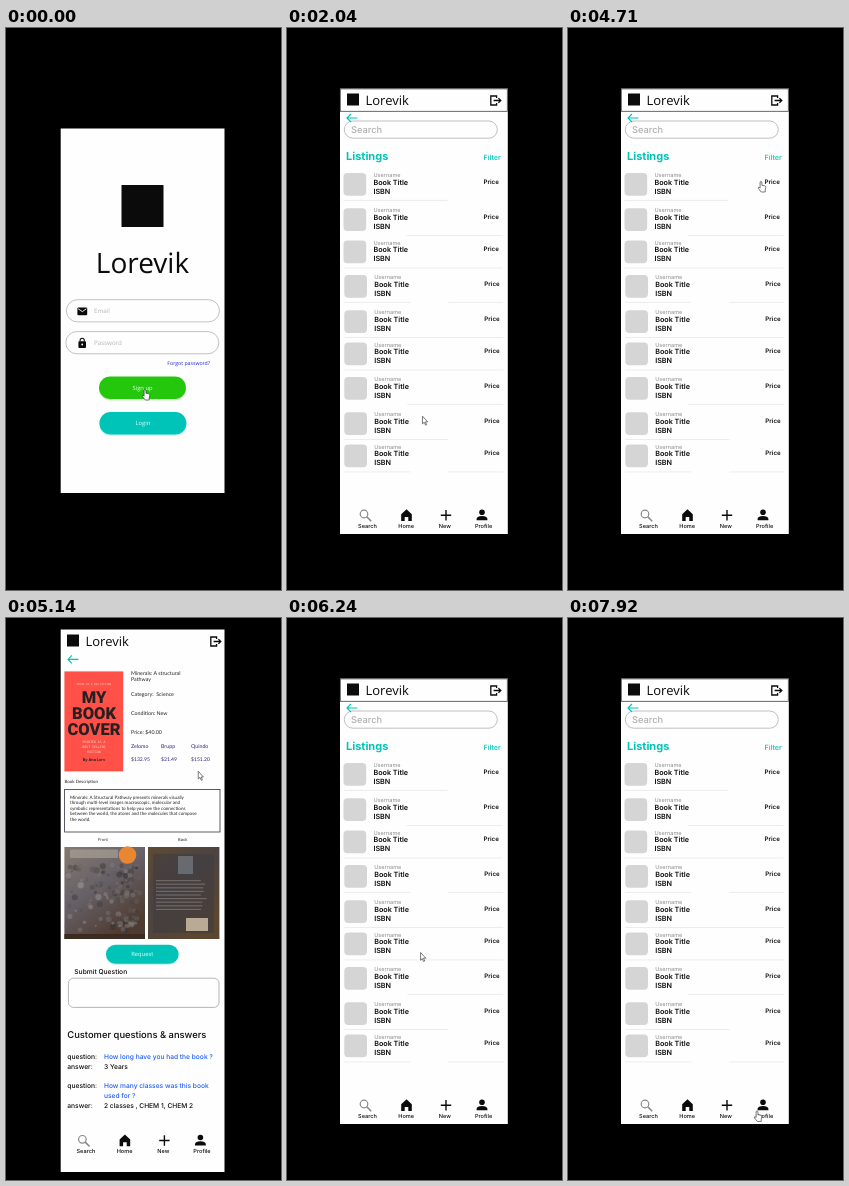
Write an HTML page that moves like this. It is 275 px wide and 562 px high and loops after 8000 ms.

```html
<!DOCTYPE html>
<html lang="en">
<head>
<meta charset="utf-8">
<title>Book exchange app</title>
<style>
html, body { margin: 0; width: 100%; height: 100%; overflow: hidden; background: #000; }
svg { display: block; width: 275px; height: 562px; }
text { font-family: Inter, sans-serif; text-rendering: geometricPrecision; white-space: pre; }
.open { font-family: "Open Sans", sans-serif; }
.lato { font-family: Lato, sans-serif; }
.cover { font-family: Roboto, sans-serif; font-stretch: 75%; }
.mono { font-family: "DejaVu Sans Mono", monospace; }
</style>
</head>
<body>
<svg id="stage" viewBox="0 0 275 562"></svg>
<script>
const TEAL = '#00c4b8', INK = '#0b0b0b', INDIGO = '#2b2380', LINK = '#1a5cf5', SOFT = '#222', PAPER = '#fefefe';

const rect = (x, y, w, h, fill, r = 0, more = '') =>
  `<rect x="${x}" y="${y}" width="${w}" height="${h}" rx="${r}" fill="${fill}" ${more}/>`;
const outline = (x, y, w, h, r, color, width = .7) =>
  rect(x, y, w, h, 'none', r, `stroke="${color}" stroke-width="${width}"`);
const path = (d, color, width = 1) =>
  `<path d="${d}" fill="none" stroke="${color}" stroke-width="${width}"/>`;
const solid = d => `<path d="${d}" fill="${INK}"/>`;
const circle = (x, y, r, fill, more = '') => `<circle cx="${x}" cy="${y}" r="${r}" fill="${fill}" ${more}/>`;
const text = (x, y, size, str, fill = INK, weight = 400, font = '', anchor = 'start') =>
  `<text x="${x}" y="${y}" font-size="${size}" fill="${fill}" font-weight="${weight}" class="${font}" text-anchor="${anchor}">${str}</text>`;
const move = (x, y, body) => `<g transform="translate(${x} ${y})">${body}</g>`;
const each = (list, draw) => list.map(draw).join('');
const times = (n, draw) => each([...Array(n).keys()], draw);

const backArrow = (x, y) => path(`M${x + 11} ${y}H${x + .6}M${x + 4.5} ${y - 4}L${x + .6} ${y}l3.9 4`, TEAL, 1.15);

// logo stand-in, name and exit icon
function header(x, y) {
  return move(x, y, rect(0, 0, 12, 12, INK) + text(18.5, 11.1, 13, 'Lorevik', INK, 400, 'open') +
    path('M149.6 4.5V2.5H143.8V11.5H149.6V9.5', INK, 1.3) + path('M146.6 7H153.6M151.4 4.6L153.8 7 151.4 9.4', INK, 1.3));
}

function nav(x, y) {
  const icons = circle(77, 486, 3.8, 'none', 'stroke="#888" stroke-width="1.2"') + path('M79.8 488.8L84.2 493.2', '#888', 1.6) +
    solid('M114.2 486.2L119.5 481.2 124.8 486.2V493H121.3V489H117.7V493H114.2Z') +
    path('M159 482V492.4M153.8 487.2H164.2', INK, 1.4) +
    circle(195, 484.2, 2.8, INK) + solid('M189.6 492.3V490.8Q190.2 488 195 488T200.4 490.8V492.3Z');
  return move(x, y, icons + each(['Search', 'Home', 'New', 'Profile'], (str, i) =>
    text(80.5 + 38.7 * i, 499.5, 5.6, str, INK, 500, '', 'middle')));
}

function button(x, y, w, h, fill, str) {
  return rect(x, y + 1.4, w, h, fill, h / 2, 'opacity=".2"') + rect(x, y, w, h, fill, h / 2) +
    text(x + w / 2, y + h / 2 + 2, 5.8, str, '#e9fffb', 400, 'open', 'middle');
}

function field(x, y, str) {
  return outline(x, y, 153, 22.2, 11, '#a8a8a8') + text(88, y + 13.7, 6.2, str, '#b5b5b5', 400, 'open');
}

function loginScreen() {
  return rect(54.7, 100.5, 163.8, 364.5, PAPER) +
    rect(115.5, 157, 42, 42, INK) +
    text(136.5, 245, 28, 'Lorevik', INK, 400, 'open', 'middle') +
    field(60.4, 271.7, 'Email') + field(59.8, 303.6, 'Password') +
    rect(71.4, 279.4, 9.8, 7.8, INK, 1) + path('M72.2 280.8L76.3 283.6 80.4 280.8', '#fff', .9) +
    rect(72.4, 313.2, 7.6, 6.7, INK, .9) + path('M74.1 313.5V312.3a2.1 2.1 0 0 1 4.2 0V313.5', INK, 1.1) +
    circle(76.2, 316.5, .9, '#fff') +
    text(204, 336.6, 5.2, 'Forgot password?', '#2222dd', 400, 'open', 'end') +
    button(93, 348.5, 87, 22.5, '#24c70c', 'Sign up') +
    button(93.4, 384, 87, 22.5, TEAL, 'Login');
}

// divider under each row: full, left part, right part or gap in the middle
const DIVIDER = { F: 'M57 0H216', L: 'M57 0H161', R: 'M120 0H216', G: 'M57 0H123M161 0H216' };

// rows come in blocks of three
function listRow(kind, i) {
  const y = 156.5 + 102 * Math.floor(i / 3) + [0, 35.1, 67.5][i % 3];
  return move(i < 3 ? 0 : .8, y,
    rect(56.5, -11.4, 22.7, 22.7, '#d5d5d5', 4) +
    text(86.4, -7.2, 5.6, 'Username', '#8c8c8c') +
    text(86.4, 0, 7.2, 'Book Title', INK, 600) +
    text(86.4, 9.3, 7.2, 'ISBN', INK, 600) +
    text(196.5, -.8, 6.2, 'Price', INK, 600) +
    move(-.5, 15.9, path(DIVIDER[kind], '#e8e8e8', .8)));
}

function listScreen() {
  return rect(53, 60.5, 167.8, 445.5, PAPER) +
    outline(53.3, 60.9, 167, 22.4, 0, '#444', .8) + header(60, 65.5) +
    outline(57.3, 93, 153, 17.2, 8.6, '#a5a5a5') + backArrow(59.4, 90) +
    text(64, 105.4, 9.3, 'Search', '#b0b0b0', 500) +
    text(59, 131.8, 11, 'Listings', TEAL, 700) +
    text(196.5, 131.6, 7.2, 'Filter', TEAL, 500) +
    each([...'LRFGFFRLG'], listRow) + nav(0, 0);
}

function bookCover() {
  const middle = (y, size, str, fill, weight, font) => text(88, y, size, str, fill, weight, font, 'middle');
  return rect(58.4, 53.4, 58.8, 100, '#ff5148') +
    middle(66.6, 2.6, 'HOUSE OF A BIG FICTION', '#ffd9d2', 400, 'mono') +
    each(['MY', 'BOOK', 'COVER'], (w, i) => middle(85 + 15.8 * i, 16.5, w, '#272022', 900, 'cover')) +
    each(['PRINTED AS A', 'BEST SELLING', 'EDITION'], (w, i) => middle(125 + 5 * i, 3.2, w, '#ffd9d2', 400, 'mono')) +
    middle(142.8, 3.8, 'By Ana Lorv', '#272022', 700, '');
}

let seed = 7;
const random = () => (seed = seed * 16807 % 2147483647) / 2147483647;

function photos() {
  const beads = times(130, i => {
    const x = 60 + 74 * random(), y = 246 + 68 * random();
    const tone = 70 + 100 * random() - .5 * (x - 60);
    return circle(x, y, 1 + 2.2 * random(), `rgb(${tone} ${tone * .95} ${tone * .94})`, 'opacity=".55"');
  });
  const blurb = times(9, i => rect(150, 262 + 3.6 * i, 44 + 8 * random(), 1.2, '#a29a94', 0, 'opacity=".45"'));
  return rect(58.4, 229, 80.6, 92, 'url(#front)') + beads +
    rect(64, 231.5, 48, 8.5, '#b0a89e', 1, 'opacity=".6"') +
    circle(121.5, 237, 8.8, '#e88632') + rect(58.4, 316, 80.6, 5, '#3b2b20') +
    rect(142, 229, 71.4, 92, 'url(#back)') +
    rect(147, 236, 61, 79, '#403c40', 0, 'opacity=".6"') +
    rect(172, 238, 15, 18, '#7f8890', 0, 'opacity=".6"') + blurb +
    rect(180, 300, 22, 13, '#b8aa94');
}

function detailScreen() {
  const small = (x, y, str, fill = SOFT, size = 5.3) => text(x, y, size, str, fill, 400, 'lato');
  const stores = [['Zelomo', '$132.95'], ['Brupp', '$21.49'], ['Quindo', '$151.20']];
  const about = [
    'Minerals: A Structural Pathway presents minerals visually',
    'through multi-level images macroscopic, molecular and',
    'symbolic representations to help you see the connections',
    'between the world, the atoms and the molecules that compose',
    'the world.'
  ];
  const answers = [
    ['question:', 'How long have you had the book ?', LINK],
    ['answer:', '3 Years', INK],
    ['', '', INK],
    ['question:', 'How many classes was this book', LINK],
    ['', 'used for ?', LINK],
    ['answer:', '2 classes , CHEM 1, CHEM 2', INK]
  ];
  return rect(54.7, 11.5, 163.8, 542.5, PAPER) + header(61, 16.5) + backArrow(61.4, 41.4) + bookCover() +
    each(['Minerals: A structural', 'Pathway'], (str, i) => small(125, 56.6 + 6.4 * i, str)) +
    each(['Category:  Science', 'Condition: New', 'Price: $40.00'], (str, i) => small(125, 78.3 + 19 * i, str)) +
    each(stores, ([name, price], i) => small(125 + 30 * i, 130, name, INDIGO) + small(125 + 30 * i, 143.2, price, INDIGO, 5.1)) +
    small(58.5, 165, 'Book Description', SOFT, 4.4) +
    outline(58.6, 171.5, 155.4, 42.5, 0, '#33333f', .8) +
    each(about, (line, i) => small(64, 180.7 + 5.5 * i, line, SOFT, 4.6)) +
    text(97, 223, 4, 'Front', SOFT, 400, '', 'middle') +
    text(176.7, 223, 4, 'Back', SOFT, 400, '', 'middle') +
    photos() + button(100, 326.7, 72.6, 19, TEAL, 'Request') +
    text(68.3, 356.4, 6.7, 'Submit Question', INK, 500) +
    outline(62.4, 360.2, 150.6, 29.2, 5, '#999') +
    text(61.3, 420.2, 9.4, 'Customer questions &amp; answers', INK, 500) +
    each(answers, ([head, str, fill], i) =>
      text(61.3, 441 + 9.73 * i, 6.7, head, INK, 500) + text(98, 441 + 9.73 * i, 6.65, str, fill, 500)) +
    nav(-.6, 35.3);
}

const gradient = (id, a, b, c) => `<linearGradient id="${id}" x2=".6" y2="1"><stop stop-color="${a}"/>` +
  `<stop offset=".5" stop-color="${b}"/><stop offset="1" stop-color="${c}"/></linearGradient>`;

const stage = document.getElementById('stage');
stage.innerHTML = `<defs>${gradient('front', '#857a70', '#666067', '#4e3a2e')}${gradient('back', '#5e4a35', '#4b4342', '#5c462f')}</defs>` +
  each([loginScreen(), listScreen(), detailScreen()], s => `<g class="screen">${s}</g>`) +
  '<path id="pointer" fill="#fff" stroke="#333" stroke-width=".65" stroke-linejoin="round"/>';

const screens = [...document.querySelectorAll('.screen')];
const pointer = document.getElementById('pointer');
const ARROW = 'M.3 .3V8L2 6.4 3.3 9.3 4.4 8.8 3.2 6H5.5Z';
const HAND = 'M2.1 1Q3.1 -.2 3.9 1V4.3L6.8 4.8Q8 5.1 7.8 6.4L7.2 9V11H3.2L.5 7.5Q0 6.2 1 6.2L2.1 7Z';

// the pointer is sampled every STEP ms; turning points are [step, x, y]
const STEP = 140;
const turns = [
  [-4, 136, 361], [-1, 136, 361], [0, 138.5, 361], [2, 134.6, 381.5], [4, 135, 388], [22, 135.6, 387.7],
  [23, 138.7, 390], [25, 173, 307], [27, 197, 279], [28, 213, 152], [30, 190, 153], [34, 192.6, 153],
  [35, 189.4, 249.5], [37, 155, 343.5], [39, 131, 334.4], [41, 133.3, 334.2], [43, 151.4, 363],
  [46, 143.7, 410], [48, 151, 456.7], [49, 151, 456.7], [51, 182, 492], [53, 186, 492.4]
];

function pointerAt(t) {
  const step = Math.floor((t - 500) / STEP);
  const next = turns.findIndex(p => p[0] > step);
  if (next < 0) return turns.at(-1).slice(1);
  const [s0, x0, y0] = turns[next - 1], [s1, x1, y1] = turns[next];
  const k = (step - s0) / (s1 - s0);
  return [x0 + (x1 - x0) * k, y0 + (y1 - y0) * k];
}

const within = (t, a, b) => t >= a && t < b;

function draw(now) {
  const t = now % 8000;
  const current = t < 500 ? 0 : within(t, 5140, 6240) ? 2 : 1;
  const pointing = t < 500 || within(t, 4710, 5140) || within(t, 5970, 6240) || t >= 7790;
  screens.forEach((s, i) => s.style.display = i === current ? '' : 'none');
  pointer.setAttribute('d', pointing ? HAND : ARROW);
  pointer.setAttribute('transform', `translate(${pointerAt(t)})`);
}

const start = performance.now();
function tick() {
  draw(performance.now() - start);
  requestAnimationFrame(tick);
}
tick();
</script>
</body>
</html>
```
